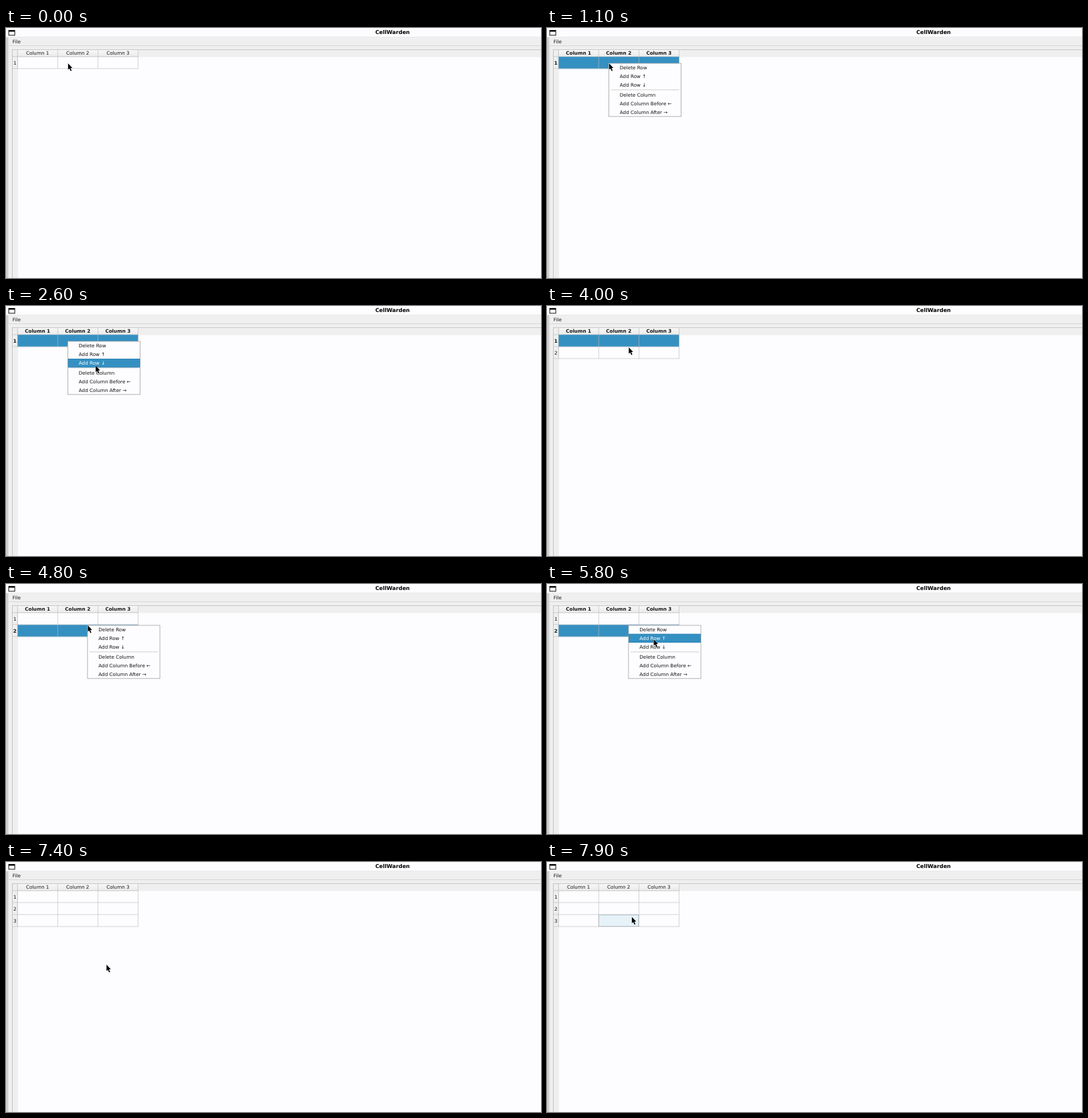
These frames come from a looping animation (800x375 px, 8000 ms). An HTML page with a canvas:

```html
<!DOCTYPE html>
<html lang="en">
<head>
<meta charset="utf-8">
<title>CellWarden</title>
<style>
  html, body { margin: 0; width: 100%; height: 100%; overflow: hidden; background: #fdfcfe; }
  canvas { display: block; }
</style>
</head>
<body>
<canvas id="stage" width="800" height="375"></canvas>
<script>
const ctx = document.getElementById('stage').getContext('2d');
const LOOP = 8000, STEP = 100;
const BLUE = '#3590c2', PANEL = '#efeff0', PAPER = '#fdfcfe', INK = '#141414';
const FONT = '"DejaVu Sans", sans-serif';

const LEFT = 17.4, TOP = 43.2, COL = 60.1, ROW = 18;
const ITEMS = [
  ['Delete Row', 0], ['Add Row ↑', 13.3], ['Add Row ↓', 26.6],
  ['Delete Column', 41], ['Add Column Before ←', 54.3], ['Add Column After →', 67.6]
];

// Pointer moves: start time, number of steps, destination
const START = [92.5, 53];
const MOVES = [
  [1800, 9, [133.8, 89.6]],
  [3400, 7, [122, 62]],
  [5300, 6, [159.3, 83]],
  [6700, 7, [150, 154]],
  [7500, 5, [126.6, 82.4]]
];

function rect(x, y, w, h, color) {
  ctx.fillStyle = color;
  ctx.fillRect(x, y, w, h);
}

function text(str, x, y, { bold = false, size = 7.2, align = 'left', color = INK } = {}) {
  ctx.font = `${bold ? 'bold ' : ''}${size}px ${FONT}`;
  ctx.textAlign = align;
  ctx.fillStyle = color;
  ctx.fillText(str, x, y);
}

function pointerAt(t) {
  let pos = START;
  for (const [start, steps, to] of MOVES) {
    if (t < start) break;
    const k = Math.min(steps, Math.floor((t - start) / STEP) + 1) / steps;
    const e = k * k * (3 - 2 * k);
    pos = pos.map((v, i) => v + (to[i] - v) * e);
  }
  return pos;
}

function stateAt(t) {
  const rows = t < 3400 ? 1 : t < 6600 ? 2 : 3;
  let selected = -1, menu = null;
  if (t >= 1100 && t < 7400) selected = t < 4400 ? 0 : rows - 1;
  if (t >= 1100 && t < 3300) menu = { x: 92, y: 52.6, live: t >= 1800 };
  if (t >= 4400 && t < 6500) menu = { x: 121.5, y: 61.6, live: t >= 5300 };
  return { rows, selected, menu, hover: t >= 7400 };
}

function drawWindow() {
  rect(0, 0, 800, 375, PAPER);
  rect(0, 13.5, 800, 30, PANEL);
  rect(0, 13.5, 800, 0.6, '#e2e2e2');
  rect(3, 13.5, 15, 361.5, PANEL);
  rect(0, 14, 3.5, 361, '#cfcfcf');
  rect(4, 26.2, 796, 0.7, '#cfcfcf');

  rect(3.6, 3, 10, 8.4, '#111');
  rect(4.6, 5.6, 8, 4.8, '#fff');
  text('CellWarden', 578, 9.4, { bold: true, size: 8, align: 'center', color: '#000' });
  text('File', 9.8, 22.8);
}

function drawTable({ rows, selected, hover }, [px, py]) {
  const right = LEFT + 3 * COL, bottom = TOP + rows * ROW;
  const grid = '#b9b9b9';

  const shade = ctx.createLinearGradient(0, 32, 0, 43);
  shade.addColorStop(0, '#f8f8f8');
  shade.addColorStop(1, '#ebebeb');
  rect(LEFT, 32.6, right - LEFT, 10.4, shade);
  rect(9, 32, 791, 0.7, '#b8b8b8');
  rect(9, 32, 0.8, 343, '#b8b8b8');
  rect(9, 42.6, right - 9, 0.7, '#bababa');
  rect(LEFT - 0.6, 33, 0.7, bottom - 33, '#b4b4b4');

  if (selected >= 0) rect(LEFT, TOP + selected * ROW, right - LEFT, ROW, BLUE);

  for (let c = 0; c < 3; c++) {
    const x = LEFT + (c + 1) * COL - 0.6;
    text(`Column ${c + 1}`, x - COL / 2 + 0.3, 40.3, { bold: selected >= 0, align: 'center' });
    rect(x, 33, 0.6, bottom - 33, grid);
  }
  for (let r = 0; r < rows; r++) {
    const y = TOP + r * ROW;
    text(r + 1, 13.2, y + 11.6, { bold: r === selected, align: 'center' });
    rect(9, y + ROW - 0.6, right - 9, 0.6, grid);
  }

  const c = Math.floor((px - LEFT) / COL), r = Math.floor((py - TOP) / ROW);
  if (hover && c >= 0 && c < 3 && r >= 0 && r < rows) {
    const x = LEFT + c * COL, y = TOP + r * ROW;
    rect(x - 0.3, y - 0.3, COL, ROW, '#a3b3bb');
    rect(x + 0.5, y + 0.5, COL - 1.6, ROW - 1.6, '#e6f2f7');
  }
}

function drawMenu({ x, y, live }, py) {
  rect(x, y, 109, 80.6, '#a2a2a2');
  rect(x + 0.8, y + 0.8, 107.4, 79, PAPER);
  rect(x + 3.4, y + 39.9, 102.4, 0.7, '#bdbdbd');
  for (const [label, dy] of ITEMS) {
    const top = y + dy - 0.2;
    const active = live && py >= top && py < top + 13.3;
    if (active) {
      rect(x + 0.6, top, 107.8, 13.3, '#2e7ca8');
      rect(x + 1.2, top + 0.6, 106.6, 12.1, BLUE);
    }
    text(label, x + 16.8, y + dy + 8.9, { color: active ? '#fff' : INK });
  }
}

function drawPointer([x, y]) {
  ctx.save();
  ctx.translate(x, y);
  ctx.beginPath();
  ctx.moveTo(0.3, 0);
  ctx.lineTo(0.3, 9.6);
  ctx.lineTo(2.4, 7.7);
  ctx.lineTo(4.1, 11.6);
  ctx.lineTo(5.7, 10.9);
  ctx.lineTo(4, 7.1);
  ctx.lineTo(6.8, 6.9);
  ctx.closePath();
  ctx.lineWidth = 1;
  ctx.lineJoin = 'round';
  ctx.strokeStyle = 'rgba(255,255,255,0.75)';
  ctx.stroke();
  ctx.fillStyle = '#000';
  ctx.fill();
  ctx.restore();
}

function draw(t) {
  const state = stateAt(t), pointer = pointerAt(t);
  drawWindow();
  drawTable(state, pointer);
  if (state.menu) drawMenu(state.menu, pointer[1]);
  drawPointer(pointer);
}

ctx.textRendering = 'geometricPrecision';
const began = performance.now();
function tick() {
  draw((performance.now() - began) % LOOP);
  requestAnimationFrame(tick);
}
tick();
</script>
</body>
</html>
```
